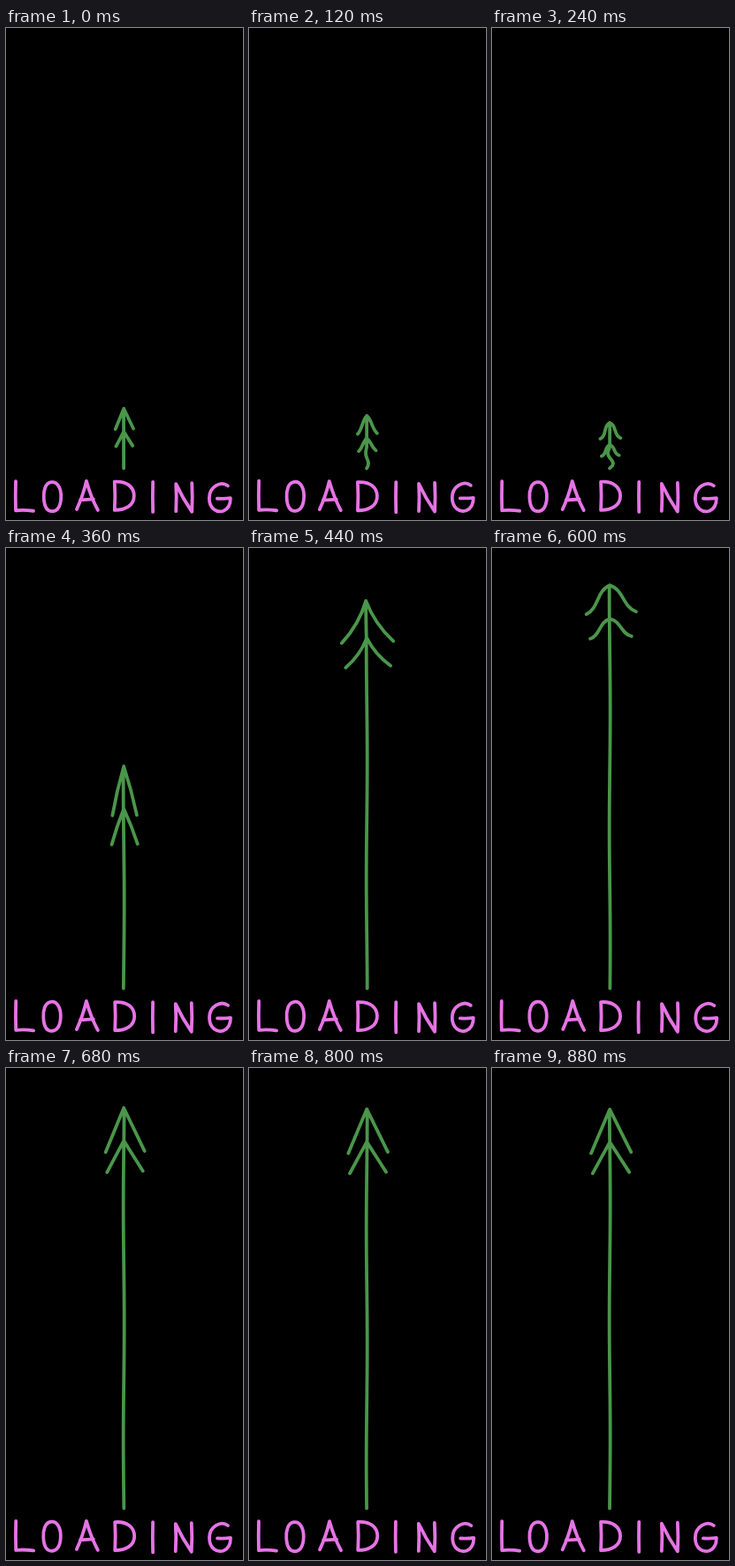
These frames come from a looping animation (268x557 px, 0.96 s). An HTML page:

```html
<!DOCTYPE html>
<html lang="en">
<head>
<meta charset="utf-8">
<title>Loading</title>
<style>
  html, body { margin: 0; width: 100%; height: 100%; overflow: hidden; background: #000; }
  svg { display: block; width: 100%; height: 100%; }
  path { fill: none; stroke-width: 3.8; stroke-linecap: round; stroke-linejoin: round; }
</style>
</head>
<body>
<svg viewBox="0 0 268 557" role="img" aria-label="LOADING">
  <filter id="soft" filterUnits="userSpaceOnUse" x="0" y="0" width="268" height="557" color-interpolation-filters="sRGB">
    <feGaussianBlur stdDeviation="0.45"/>
  </filter>
  <rect width="268" height="557" fill="#000"/>
  <g filter="url(#soft)">
    <path id="arrow" stroke="#4a964a"/>
    <g id="word" stroke="#e574e5">
      <path d="M11 513Q10.500 530 11 546Q21 545 31 546.500"/>
      <path d="M51 514C44 515 42 524 42.500 532C43 541 46 547 52 547C59 547 62 539 62 530C62 521 58 513 51 514"/>
      <path d="M80 545Q87 530 91 513Q96 531 104 546M84 534.500L99 533.500"/>
      <path d="M123 514Q124 530 123 546C135 546 145 541 145 530C145 520 137 513 123 514"/>
      <path d="M166 514Q165.500 530 166 548"/>
      <path d="M192 547Q193 531 192 516Q200 533 210 547.500Q211 531 210 515"/>
      <path d="M251 518C243 512 230 519 230 532C230 544 239 549 246 546.500C252 544 254 538 254 532Q247 533 239 532.500"/>
    </g>
  </g>
</svg>
<script>
const STEP = 40, LOOP = 960;
const CROUCH = 240, PEAK = 480;          // ms: fully squashed, fully stretched
const X = 133.2, BASE = 498.5;
const START = 431, LOW = 447, HIGH = 26, REST = 47;   // heights of the tip

const arrow = document.getElementById('arrow');
const letters = [...document.getElementById('word').children];

// Branches: angle from the stem in degrees, length, gap between pairs, bend at both thirds
const KEYS = [
  { at: 0,   angle: 24, len: 25, gap: 26, near: 0,  far: 0 },
  { at: 240, angle: 33, len: 21, gap: 25, near: 5,  far: -5 },
  { at: 360, angle: 14, len: 57, gap: 48, near: 1,  far: 1 },
  { at: 480, angle: 41, len: 54, gap: 39, near: -7, far: -7 },
  { at: 600, angle: 42, len: 42, gap: 38, near: 8,  far: -7 },
  { at: 680, angle: 24, len: 54, gap: 37, near: 0,  far: 0 },
  { at: 960, angle: 25, len: 54, gap: 37, near: 0,  far: 0 }
];

const mix = (a, b, k) => a + (b - a) * k;
const smooth = k => k * k * (3 - 2 * k);
const xy = (x, y) => x.toFixed(2) + ' ' + y.toFixed(2);

function branchesAt(t) {
  const i = KEYS.findIndex(key => key.at > t);
  const a = KEYS[i - 1], b = KEYS[i], k = (t - a.at) / (b.at - a.at);
  const pose = {};
  for (const name in a) pose[name] = mix(a[name], b[name], k);
  return pose;
}

function tipAt(t) {
  if (t < CROUCH) return mix(START, LOW, t / CROUCH);
  if (t < PEAK) return mix(LOW, HIGH, smooth(((t - CROUCH) / (PEAK - CROUCH)) ** 1.05));
  return mix(REST, HIGH, Math.exp((PEAK - t) / 80));
}

function branch(x, y, side, angle, len, near, far) {
  const a = angle * (1 + side * 0.07) * Math.PI / 180;
  const sin = Math.sin(a), cos = Math.cos(a);
  const at = (k, bend) =>
    xy(x + side * (sin * len * k + cos * bend), y + cos * len * k - sin * bend);
  return `M${xy(x, y)}C${at(1 / 3, near)} ${at(2 / 3, far)} ${at(1, 0)}`;
}

function stem(x, top, squiggle, t) {
  const height = BASE - top, n = Math.ceil(height / 3);
  const sway = 0.5 * Math.min(1, height / 250);
  let d = 'M' + xy(x, top);
  for (let i = 1; i <= n; i++) {
    const y = top + height * i / n;
    const u = Math.max(0, 1 - (BASE - y) / 24);
    const lean = (x - X) * Math.max(0, 1 - (y - top) / 40);
    const curl = -squiggle * Math.sin(u * 2 * Math.PI) * (0.3 + 0.9 * u);
    d += 'L' + xy(X + lean + curl + sway * Math.sin(y / 42 + t / 21), y);
  }
  return d;
}

function draw(t) {
  const { angle, len, gap, near, far } = branchesAt(t);
  const top = tipAt(t);
  const x = X - 2 * Math.max(0, 1 - Math.abs(t - PEAK) / 80);
  const squiggle = 4 * Math.max(0, 1 - Math.abs(t - CROUCH) / (t < CROUCH ? CROUCH : 80));

  let d = stem(x, top, squiggle, t);
  for (const side of [-1, 1]) {
    d += branch(x, top, side, angle, len, near, far);
    d += branch(X, top + gap, side, angle + 6, len * 0.75, near * 0.8, far * 0.8);
  }
  arrow.setAttribute('d', d);

  letters.forEach((el, i) => {
    const dx = 0.25 * Math.sin(t / 17 + i * 1.7), dy = 0.25 * Math.cos(t / 13 + i);
    el.setAttribute('transform', `translate(${xy(dx, dy)})`);
  });
}

let last = -1;
function tick() {
  const step = Math.floor(performance.now() % LOOP / STEP);
  const t = Math.min(step * STEP, LOOP - 2 * STEP);
  if (t !== last) draw(last = t);
  requestAnimationFrame(tick);
}
tick();
</script>
</body>
</html>
```
